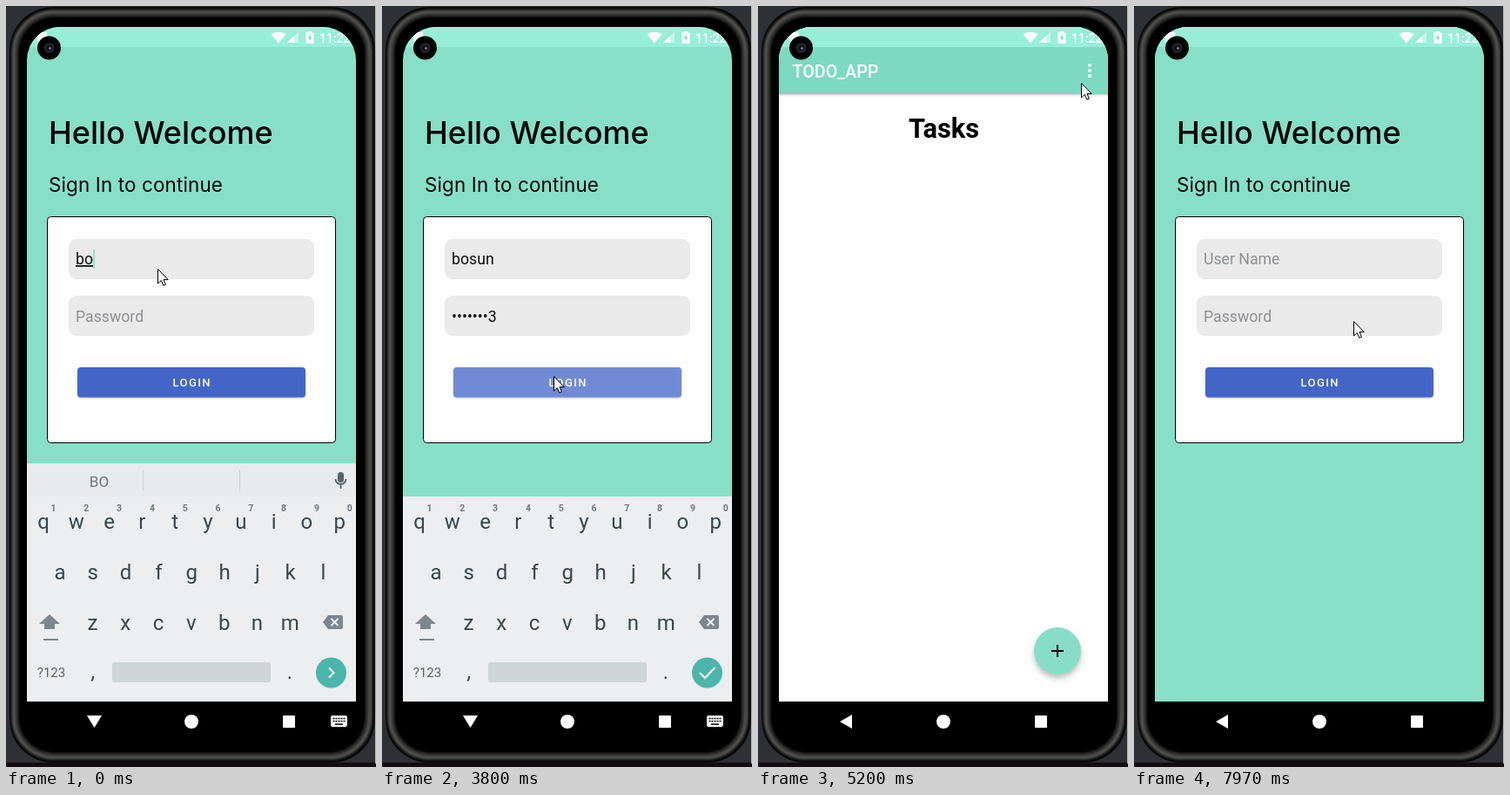
Recreate the animation shown at these times as an HTML page. Size 425 by 872 pixels, loop 8 s.

```html
<!DOCTYPE html>
<html lang="en">
<head>
<meta charset="utf-8">
<title>Login and tasks demo</title>
<style>
  html, body { margin: 0; width: 100%; height: 100%; overflow: hidden; background: #2d3035; }
  svg { display: block; width: 425px; height: 872px; }
  text { font-family: Roboto, sans-serif; white-space: pre; }
  .head { font-family: Inter, sans-serif; }
  .field { font-size: 17.7px; }
  .key { font-size: 24px; fill: #37474f; text-anchor: middle; }
  .num { font-size: 10.5px; font-weight: 700; fill: #6f7a80; text-anchor: middle; }
  .hintword { font-size: 17px; fill: #6b777d; text-anchor: middle; }
  .item { font-size: 15.4px; fill: #222; }
  .lift { filter: drop-shadow(0 1.5px 1.2px rgba(0,0,0,.22)); }
  .soft { filter: blur(1px); }
</style>
</head>
<body>
<svg viewBox="0 0 425 872">
  <defs>
    <clipPath id="glass"><rect x="24" y="24" width="378" height="813" rx="38"/></clipPath>
    <clipPath id="btn"><rect x="82" y="414" width="262" height="35" rx="4"/></clipPath>
    <clipPath id="row"><rect x="209" y="198" width="189" height="47"/></clipPath>
  </defs>

  <!-- phone body -->
  <rect y="867" width="425" height="5" fill="#130b10"/>
  <rect x="4" y="1" width="420" height="866" rx="50" fill="#080808"/>
  <g fill="none" class="soft">
    <rect x="10" y="8" width="407" height="852" rx="45" stroke="#30302f" stroke-width="8"/>
    <rect x="9" y="7" width="409" height="854" rx="46" stroke="#555553" stroke-width="3"/>
  </g>
  <rect x="15" y="13" width="397" height="842" rx="42"/>
  <rect x="424" width="1" height="868" fill="#bbb"/>

  <g clip-path="url(#glass)">
    <g id="screen">
      <g id="login">
        <rect x="24" y="24" width="378" height="773" fill="#88dfc7"/>
        <rect x="24" y="24" width="378" height="23" fill="#98efd8"/>
        <text class="head" x="49" y="158" font-size="36" font-weight="500">Hello Welcome</text>
        <text class="head" x="49" y="213" font-size="22.4" letter-spacing=".15">Sign In to continue</text>
        <rect x="47.500" y="241.500" width="331" height="259" rx="4" fill="#fefefe" stroke="#000"/>
        <rect x="72" y="267" width="282" height="46" rx="9" fill="#eaeaeb"/>
        <rect x="72" y="332" width="282" height="46" rx="9" fill="#eaeaeb"/>
        <text id="user" class="field" x="80" y="296"/>
        <text id="pass" class="field" x="80" y="362"/>
        <rect id="caret" width="2" height="22" fill="#88e6d0"/>
        <rect class="lift" x="82" y="414" width="262" height="34.500" rx="4" fill="#4465c8"/>
        <g id="ripple" clip-path="url(#btn)" fill="#fff">
          <rect x="82" y="414" width="262" height="35" opacity=".24"/>
          <circle id="wave1" cx="202" cy="432" opacity=".1"/>
          <circle id="wave2" cx="213" cy="432" opacity=".1"/>
        </g>
        <text x="213.700" y="436" font-size="13" font-weight="500" letter-spacing="1.4" fill="#fff" text-anchor="middle">LOGIN</text>
      </g>

      <g id="tasks">
        <rect x="24" y="24" width="378" height="773" fill="#fefefe"/>
        <rect class="lift" x="24" y="47" width="378" height="54" fill="#7dd9c0"/>
        <rect x="24" y="24" width="378" height="23" fill="#98efd8"/>
        <text x="39.500" y="82" font-size="19.7" font-weight="500" fill="#fff">TODO_APP</text>
        <g fill="#fff"><circle cx="381" cy="68" r="2"/><circle cx="381" cy="74" r="2"/><circle cx="381" cy="80" r="2"/></g>
        <text x="213.500" y="151" font-size="30.8" font-weight="700" text-anchor="middle">Tasks</text>
        <circle cx="344" cy="739" r="27" fill="#88ddc8" style="filter:drop-shadow(0 4px 3px rgba(0,0,0,.25))"/>
        <path d="M337 739h14M344 732v14" stroke="#000" stroke-width="2"/>
      </g>

      <g id="menu">
        <rect class="lift" x="209" y="51" width="189" height="200" rx="3" fill="#fff"/>
        <g id="press" clip-path="url(#row)" opacity=".07"><rect x="209" y="198" width="189" height="47"/><circle cx="281" cy="221" r="72"/></g>
        <text class="item" x="225" y="88">Add Task</text>
        <text class="item" x="225" y="134">Clear All</text>
        <text class="item" x="225" y="180.500">Clear All Checked</text>
        <text class="item" x="225" y="227">Logout</text>
      </g>
    </g>

    <g id="ime">
      <g id="bar">
        <rect x="24" y="524" width="378" height="39" fill="#e8ebed"/>
        <path d="M157.500 532v24M268.500 532v24" stroke="#cdd2d4"/>
        <text class="hintword" x="107" y="550.500"/>
        <text class="hintword" x="213" y="550.500"/>
        <text class="hintword" x="318" y="550.500"/>
        <rect x="381" y="534" width="7" height="12" rx="3.500" fill="#55646b"/>
        <path d="M378.500 542a6 6 0 0 0 12 0M384.500 548v5" fill="none" stroke="#55646b" stroke-width="1.800"/>
      </g>
      <rect x="24" y="562" width="378" height="235" fill="#eceef0"/>
      <g id="keys"/>
      <path d="M50 697l12 11h-6v6h-12v-6h-6zM43 725h17v2h-17z" fill="#7b888e"/>
      <path d="M364 706l6-8h15a2 2 0 0 1 2 2v12a2 2 0 0 1-2 2h-15z" fill="#7b888e"/>
      <path d="M373.500 702l8 8m0-8l-8 8" stroke="#eceef0" stroke-width="2"/>
      <text x="52" y="769" font-size="15" fill="#58666d" text-anchor="middle">?123</text>
      <rect x="122" y="752" width="182" height="23" rx="3" fill="#cfd5d7"/>
      <circle cx="373.500" cy="764" r="17.500" fill="#4cb6ac"/>
      <path id="enter" fill="none" stroke="#fff" stroke-width="2"/>
    </g>

    <rect id="imeNav" x="24" y="797" width="378" height="49"/>
    <g fill="#fff">
      <path id="back"/>
      <circle cx="213" cy="820" r="8"/>
      <rect x="318" y="813" width="14" height="14" rx="1"/>
      <g id="imeIcon">
        <rect x="373" y="813" width="19" height="13" rx="2"/>
        <path d="M375.500 816.500h14M375.500 819.500h14" stroke="#000" stroke-width="1.500" stroke-dasharray="2 1"/>
        <path d="M378 823h9" stroke="#000" stroke-width="1.500"/>
      </g>
    </g>

    <!-- status icons -->
    <g fill="#fff">
      <path d="M304.500 32.500q8.500-5.500 17 0l-8.500 10z"/>
      <path d="M336 29v13h-13z" opacity=".45"/><path d="M331 34v8h-8z"/>
      <path d="M344.500 30.500h2.500v-1.500h4v1.500h2.500v12.500h-9z"/>
      <path d="M349.500 32l-2.500 5h1.700v4l2.600-5.200h-1.800z" fill="#7dd9c0"/>
      <text x="360" y="41.500" font-size="14" font-weight="500">11:22</text>
      <rect x="36" y="30" width="11" height="11" rx="1"/>
    </g>
  </g>
  <circle cx="49.500" cy="48" r="13.500"/>
  <circle cx="49.500" cy="48" r="6" fill="#22252b"/>
  <circle cx="49.500" cy="48" r="3.500" fill="#10131a"/>
  <circle cx="50.500" cy="48.500" r="1.200" fill="#8b93a3"/>

  <path id="mouse" d="M0 0V16.500L3.800 13L6.300 18.800L8.900 17.700L6.500 12.100H11.700Z" fill="#fff" stroke="#000" stroke-linejoin="round"/>
</svg>

<script>
const $ = id => document.getElementById(id);
const set = (el, attrs) => { for (const k in attrs) el.setAttribute(k, attrs[k]); };
const show = (el, on) => set(el, { visibility: on ? 'visible' : 'hidden' });
const clamp = v => Math.min(1, Math.max(0, v));
const ramp = (t, a, b) => clamp((t - a) / (b - a));

const LOOP = 8000, WORD = 'bosun', SECRET = 'bosun123';
const OPEN = 4104, CLOSE = 7416, TO_PASS = 1450, LOGOUT = 7500;
const userTimes = [0, 0, 60, 190, 370];
const passTimes = [1900, 1960, 2270, 2510, 2630, 3060, 3130, 3200];
const suggestions = { 2: ['BO'], 3: ['bos', 'boss', 'both'], 4: ['bosu', 'bosun', 'bosuns'], 5: ['bosun', 'bosuns', "bosun's"] };
const mousePath = [
  [980, 174, 301], [1420, 134, 361], [3200, 134, 361], [3480, 197, 418], [3740, 197, 424],
  [4340, 197, 424], [4520, 290, 416], [4830, 290, 416], [5200, 371, 88], [5390, 375, 81],
  [5870, 375, 81], [6180, 307, 102], [6470, 284, 221], [6530, 280, 226], [7580, 280, 226], [7970, 252, 361]
];

function addKey(label, x, y, cls = 'key') {
  const el = document.createElementNS('http://www.w3.org/2000/svg', 'text');
  set(el, { x, y, class: cls });
  el.textContent = label;
  $('keys').append(el);
}
const addRow = (letters, x, y, cls) => [...letters].forEach((c, i) => addKey(c, x + i * 37.8, y, cls));
addRow('qwertyuiop', 43, 599);
addRow('1234567890', 54.5, 579, 'num');
addRow('asdfghjkl', 62, 657);
addRow('zxcvbnm', 99.5, 715);
addKey(',', 99.5, 771);
addKey('.', 326, 771);

const typed = (times, t) => times.filter(at => t >= at).length;

// Writes a value or its hint and returns where the caret belongs.
function fill(el, value, hint) {
  el.textContent = value || hint;
  set(el, { fill: value ? '#111' : '#8f9092' });
  return 80 + (value ? el.getComputedTextLength() : 0);
}

function drawFields(t) {
  const fresh = t >= LOGOUT, inPass = t >= TO_PASS;
  const n = fresh ? 0 : typed(userTimes, t), m = fresh ? 0 : typed(passTimes, t);
  const userEnd = fill($('user'), WORD.slice(0, n), 'User Name');
  const passEnd = fill($('pass'), m ? '•'.repeat(m - 1) + SECRET[m - 1] : '', 'Password');
  set($('user'), { 'text-decoration': inPass ? 'none' : 'underline' });
  const second = inPass && !fresh;
  set($('caret'), { x: second ? passEnd : userEnd, y: second ? 345 : 279 });
  show($('caret'), fresh ? t < 7800 : t < 3740);
  const words = suggestions[n] || [];
  document.querySelectorAll('.hintword').forEach((el, i) => el.textContent = words[i] || '');
}

// Window entering from slightly below while fading in.
function enter(el, t, start) {
  const dy = 62 * (1 - ramp(t, start, start + 400)) ** 1.45;
  set(el, { opacity: ramp(t, start, start + 200), transform: `translate(0 ${dy})` });
}
const settle = el => set(el, { opacity: 1, transform: '' });

function drawScreens(t) {
  const leaving = t >= LOGOUT;
  $('screen').insertBefore($('login'), leaving ? null : $('tasks'));
  if (leaving) { enter($('login'), t, CLOSE); settle($('tasks')); }
  else { settle($('login')); enter($('tasks'), t, OPEN); }

  const spread = Math.max(0, (t - 3800) / 360);
  show($('ripple'), spread > 0 && !leaving);
  set($('wave1'), { r: 79 * spread });
  set($('wave2'), { r: 58 * spread });

  const grow = ramp(t, 5690, 5860), s = .75 + .25 * grow;
  set($('menu'), { opacity: grow, transform: `translate(398 51) scale(${s}) translate(-398 -51)` });
  show($('press'), leaving);
}

function drawKeyboard(t) {
  const out = ramp(t, 4280, 4440), up = t < 4300;
  set($('ime'), { opacity: 1 - out, transform: `translate(0 ${60 * out})` });
  show($('bar'), t < TO_PASS);
  set($('enter'), { d: t < TO_PASS ? 'M371 758.5l5.5 5.5-5.5 5.5' : 'M365 764l6 6 11.5-12' });
  show($('imeNav'), t < 4440);
  show($('imeIcon'), up);
  set($('back'), { d: up ? 'M93 813h17l-8.5 14z' : 'M94 820l14-8v16z' });
}

function drawMouse(t) {
  const next = mousePath.findIndex(p => p[0] > t);
  const b = mousePath.at(next), a = next > 0 ? mousePath[next - 1] : b;
  const p = a === b ? 0 : ramp(t, a[0], b[0]);
  const x = a[1] + (b[1] - a[1]) * p, y = a[2] + (b[2] - a[2]) * p;
  set($('mouse'), { transform: `translate(${x + .5} ${y + .5})` });
}

const start = performance.now();
function frame() {
  const t = (performance.now() - start) % LOOP;
  drawFields(t);
  drawScreens(t);
  drawKeyboard(t);
  drawMouse(t);
  requestAnimationFrame(frame);
}
frame();
</script>
</body>
</html>
```
